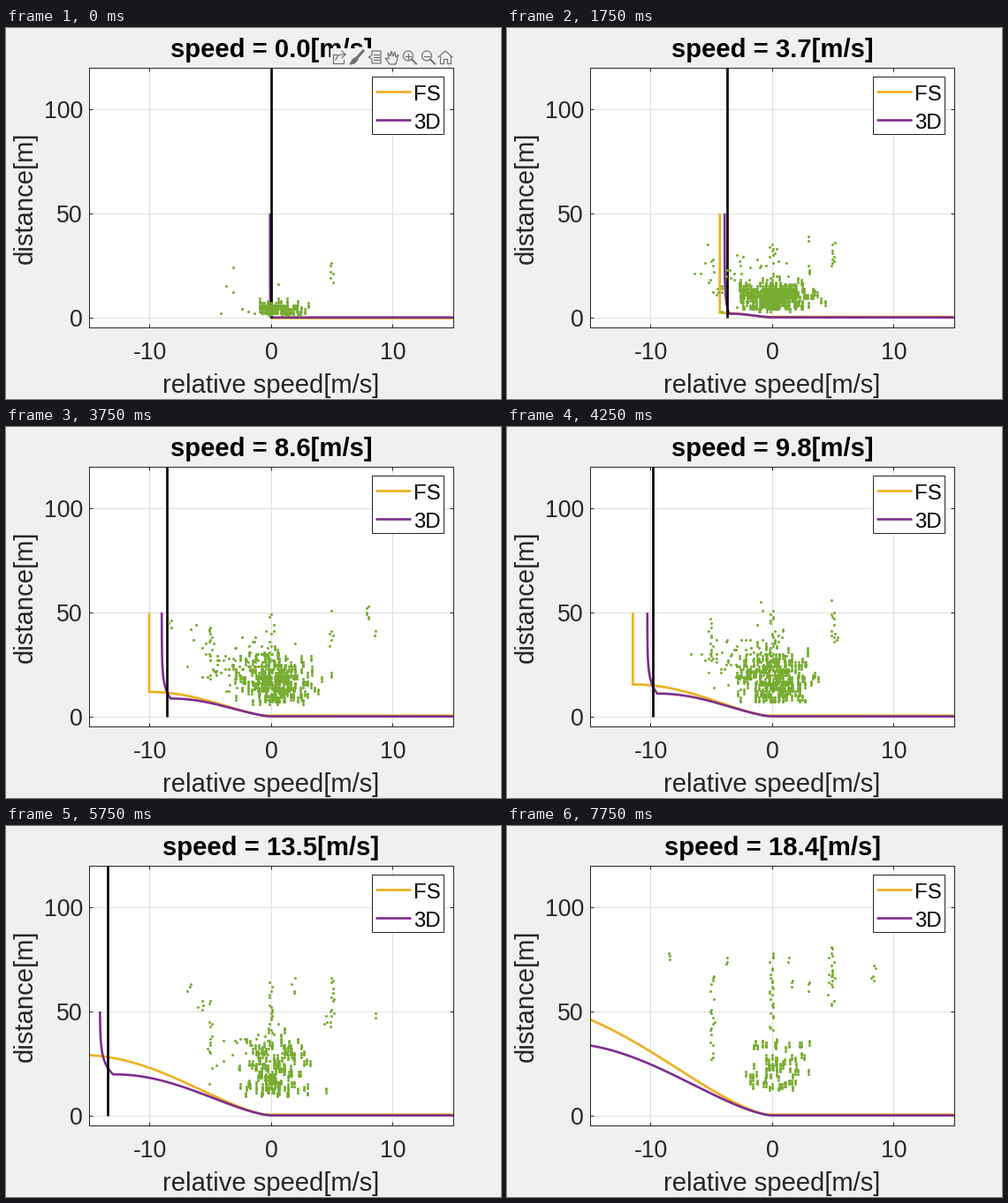
Recreate the animation shown at these times as a matplotlib script. Size 560 by 420 pixels, loop 8000 ms.

```python
import numpy as np
import matplotlib.pyplot as plt
from matplotlib.animation import FuncAnimation
from matplotlib.patches import Circle, Polygon, Rectangle

W, H, DPI = 560, 420, 100
PX = 72 / DPI
PANEL, INK = "#f0f0f0", "#262626"
GOLD, PURPLE, GREEN = "#edb120", "#7e2f8e", "#77ac30"
ICON = "#707070"
LEFT, RIGHT, TOP, BOTTOM = 93.8, 505.8, 45.4, 339.4
SPEED_STEP = 0.6125

plt.rcParams["font.family"] = "Liberation Sans"
fig = plt.figure(figsize=(W / DPI, H / DPI), dpi=DPI, facecolor=PANEL)

# Data axes
ax = fig.add_axes([LEFT / W, 1 - BOTTOM / H, (RIGHT - LEFT) / W, (BOTTOM - TOP) / H])
ax.set(xlim=(-15, 15), ylim=(-5, 120), xticks=[-10, 0, 10], yticks=[0, 50, 100])
ax.set_axisbelow(True)
ax.grid(color="#dfdfdf", lw=PX)
ax.tick_params(direction="in", top=True, right=True, length=4 * PX, width=PX,
               color=INK, labelbottom=False, labelleft=False)
for spine in ax.spines.values():
    spine.set(color=INK, linewidth=PX)

# Pixel overlay for text, legend and toolbar
ui = fig.add_axes([0, 0, 1, 1], zorder=2)
ui.set(xlim=(0, W), ylim=(H, 0))
ui.axis("off")


def label(x, y, text, size, color=INK, ha="center", **kw):
    return ui.text(x, y, text, fontsize=size * PX, color=color, ha=ha,
                   va="baseline", rotation_mode="anchor", **kw)


title = label(300, 33, "", 29.3, "black", weight="bold", zorder=3)
label(300, 413, "relative speed[m/s]", 29.3)
label(29.5, 192, "distance[m]", 29.3, rotation=90)
for x in (-10, 0, 10):
    label(300.5 + x * 13.733, 375, str(x), 26.67)
for y in (0, 50, 100):
    label(87, 337.7 - y * 2.352, str(y), 26.67, ha="right")

ui.add_patch(Rectangle((414, 55), 81, 65, fc="white", ec=INK, lw=PX))
for y, name, color in ((72.4, "FS", GOLD), (104.4, "3D", PURPLE)):
    ui.plot([418, 457.5], [y, y], color=color, lw=2.67 * PX, solid_capstyle="butt")
    label(461, y + 9.6, name, 24, "black", ha="left")

# Toolbar
toolbar = [ui.add_patch(Rectangle((367, 23), 140, 22, fc=PANEL, ec="none", zorder=4))]


def stroke(*points, width=1.2):
    toolbar.extend(ui.plot(*zip(*points), color=ICON, lw=width * PX, zorder=5))


def shape(patch):
    patch.set(edgecolor=ICON, linewidth=1.2 * PX, zorder=5)
    toolbar.append(ui.add_patch(patch))


# Share, brush, data tip, hand, zoom in, zoom out, home
stroke((375, 30), (370, 30), (370, 40), (382, 40), (382, 36))
stroke((373, 36), (375, 32), (379, 30), (384, 30))
stroke((380, 26), (384, 30), (380, 34))
stroke((404, 26), (396, 35), width=3)
shape(Polygon([(396, 33), (398, 36), (394, 40), (389, 41), (392, 36)], fc=ICON))
shape(Polygon([(414, 26), (424, 26), (424, 40), (414, 40), (414, 35), (410, 33),
               (414, 31)], fc="none"))
for y in (30, 33, 36):
    stroke((416, y), (422, y))
shape(Polygon([(434, 41), (429, 34), (433, 35), (432, 28), (435, 32), (436, 26),
               (438, 32), (440, 27), (441, 33), (444, 30), (441, 41)], fc="none"))
for x in (455, 476):
    shape(Circle((x, 31.5), 5.5, fc="none"))
    stroke((x + 4, 35.5), (x + 9, 40.5), width=2)
    stroke((x - 3, 31.5), (x + 3, 31.5))
stroke((455, 28.5), (455, 34.5))
stroke((489, 33), (497, 26), (505, 33))
stroke((491, 32), (491, 40), (495, 40), (495, 35), (499, 35), (499, 40), (503, 40),
       (503, 32))

# Moving artists
line_style = dict(lw=2.67 * PX, solid_capstyle="butt", solid_joinstyle="round")
gold_line, = ax.plot([], [], color=GOLD, **line_style)
purple_line, = ax.plot([], [], color=PURPLE, **line_style)
speed_line, = ax.plot([], [], color="black", **line_style)
dots, = ax.plot([], [], "o", color=GREEN, ms=3 * PX, mew=0)

U = np.linspace(0, 1, 80)
BRAKING = 1 - (1 - U ** 1.5) ** 2.2


def gold_curve(speed):
    reach, plateau = 1.17 * speed, .16 * speed ** 2
    base = min(.4, speed * .07)
    return (np.r_[15, -reach * U, -reach],
            np.r_[base, np.maximum(plateau * BRAKING, base), max(50, plateau)])


def purple_curve(speed):
    knee, top = .965 * speed, 1.04 * speed + .08
    plateau = .165 * speed ** 1.84
    rise = plateau + (50 - plateau) * U
    bend = top - (top - knee) * np.exp((plateau - rise) / 6)
    return np.r_[15, -knee * U, -bend], np.r_[0, plateau * BRAKING, rise]


def echoes(step, speed):
    rng = np.random.default_rng(step + 11)
    middle = 4 + 1.75 * speed - .035 * speed ** 2
    spread = min(1.7 + .5 * speed, 8)
    floor, left = 1 + .6 * speed, -.9 - .5 * speed
    horizon = 28 + 3.2 * speed

    # Main cloud, made of short vertical runs, folded at its edges
    seeds = int(min(280 + 200 * speed, 1200 - 53 * speed)) // 3
    x = np.repeat(rng.normal(.3, 1.4, seeds), 3)
    y = np.repeat(rng.normal(middle, spread, seeds), 3) + np.tile([-1, 0, 1], seeds)
    x = left + np.abs(x - left)

    # Loose echoes behind it, most of them at medium speed
    loose = int(110 * np.exp(-((speed - 8) / 5) ** 2))
    x = np.r_[x, rng.normal(-2, 2, loose)]
    y = np.r_[y, rng.normal(middle + 8, 6.5, loose)]
    y = floor + np.abs(y - floor)

    # Broken columns straight ahead and at both sides, then a few far clumps
    columns = [(5, .6 * horizon, .95 * horizon)]
    if speed > 2:
        columns += [(0, .45 * horizon, .9 * horizon), (-5, .3 * horizon, .8 * horizon)]
    for _ in range(int(speed / 2)):
        low = rng.uniform(.6, .9) * horizon
        columns.append((rng.uniform(-9, 9), low, low + rng.uniform(2, 9)))
    for column, low, high in columns:
        run = np.arange(low, high)
        run = run[rng.random(run.size) < .5]
        x = np.r_[x, column + rng.normal(0, .1, run.size)]
        y = np.r_[y, run]
    return np.round(x, 1), np.round(y)


def draw(frame):
    step = max(0, frame - 1)
    speed = step * SPEED_STEP
    title.set_text(f"speed = {speed:.1f}[m/s]")
    gold_line.set_data(*gold_curve(speed))
    purple_line.set_data(*purple_curve(speed))
    speed_line.set_data([-speed, -speed], [0, 120])
    dots.set_data(*echoes(step, speed))
    for part in toolbar:
        part.set_visible(step == 0)
    return gold_line, purple_line, speed_line, dots, title, *toolbar


anim = FuncAnimation(fig, draw, frames=32, interval=250, repeat=True, blit=False)
plt.show()
```
